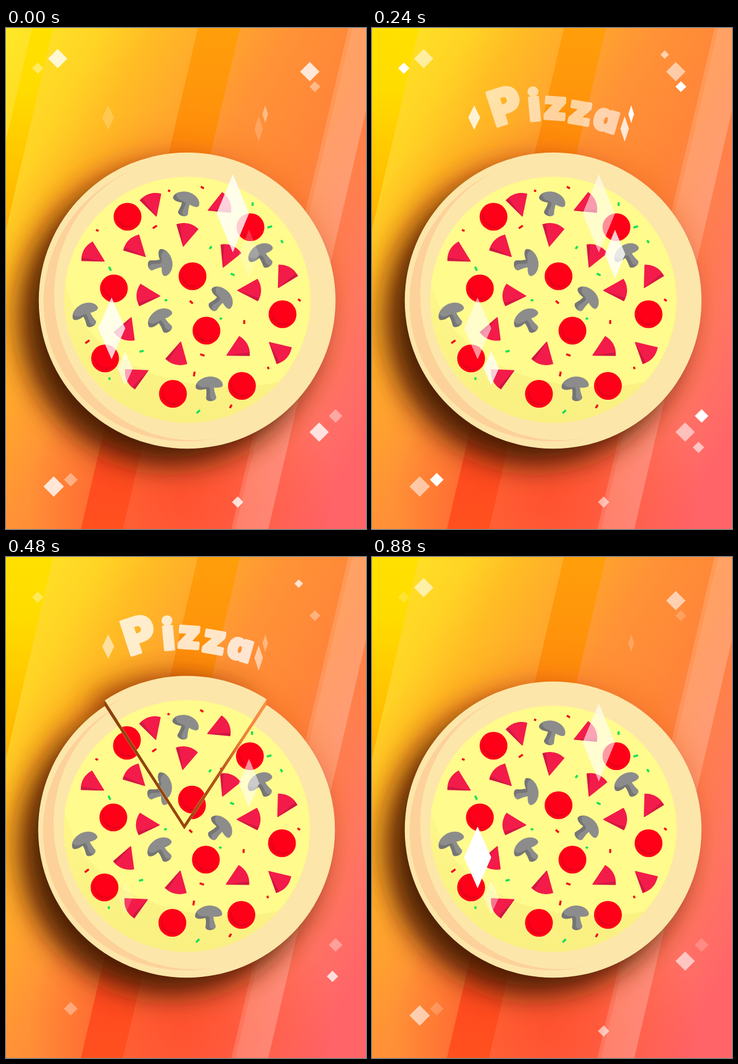
An HTML page for the animation above (0.96 s loop, 634 px wide and 884 px high).

```html
<!DOCTYPE html>
<html lang="en">
<head>
<meta charset="utf-8">
<title>Pizza</title>
<style>
html, body { margin: 0; width: 100%; height: 100%; overflow: hidden; background: #ff8a35; }
svg { display: block; width: 100vw; height: 100vh; }
#title text {
  font-family: Inter, "Open Sans", sans-serif; font-weight: 900; text-anchor: middle;
  font-feature-settings: "cv11"; fill: #fff; stroke: #fff; stroke-width: 5; stroke-linejoin: round;
}
</style>
</head>
<body>
<svg viewBox="0 0 634 884" preserveAspectRatio="none">
  <defs>
    <linearGradient id="sky" gradientUnits="userSpaceOnUse" x1="0" y1="0" x2="824" y2="472">
      <stop offset="0" stop-color="#ffe926"/>
      <stop offset=".16" stop-color="#ffd325"/>
      <stop offset=".24" stop-color="#ffbc24"/>
      <stop offset=".46" stop-color="#ff9236"/>
      <stop offset=".6" stop-color="#ff8539"/>
      <stop offset=".82" stop-color="#ff7864"/>
      <stop offset=".96" stop-color="#ff6468"/>
    </linearGradient>
    <radialGradient id="ember" gradientUnits="userSpaceOnUse" cx="310" cy="830" r="270">
      <stop offset="0" stop-color="#ff4a2a" stop-opacity=".85"/>
      <stop offset=".35" stop-color="#ff4a2a" stop-opacity=".65"/>
      <stop offset="1" stop-color="#ff4a2a" stop-opacity="0"/>
    </radialGradient>
    <linearGradient id="gold" gradientUnits="userSpaceOnUse" x1="0" y1="0" x2="0" y2="352">
      <stop offset="0" stop-color="#ffe000"/>
      <stop offset=".3" stop-color="#ffdc00"/>
      <stop offset="1" stop-color="#ffb200"/>
    </linearGradient>
    <linearGradient id="amber" gradientUnits="userSpaceOnUse" x1="0" y1="0" x2="0" y2="884">
      <stop offset="0" stop-color="#ff9f0a"/>
      <stop offset=".25" stop-color="#ff8c0c"/>
      <stop offset=".87" stop-color="#ff4a20"/>
      <stop offset="1" stop-color="#ff501e"/>
    </linearGradient>
    <linearGradient id="gap" gradientUnits="userSpaceOnUse" x1="174" y1="0" x2="459" y2="0">
      <stop offset="0" stop-color="#8c400c"/>
      <stop offset=".5" stop-color="#9a460c"/>
      <stop offset=".72" stop-color="#b8581c"/>
      <stop offset=".85" stop-color="#ee8038"/>
      <stop offset="1" stop-color="#fb9444"/>
    </linearGradient>
    <linearGradient id="rind" x1="0" y1="0" x2="0" y2="1">
      <stop offset=".4" stop-color="#fdf688"/>
      <stop offset="1" stop-color="#faf082"/>
    </linearGradient>
    <filter id="soft" x="-40%" y="-40%" width="180%" height="180%"><feGaussianBlur stdDeviation="24"/></filter>
    <filter id="wide" x="-40%" y="-40%" width="180%" height="180%"><feGaussianBlur stdDeviation="34"/></filter>
    <clipPath id="sliceClip"><path d="M315 481L105 154V0H532V152Z"/></clipPath>
    <clipPath id="restClip"><path clip-rule="evenodd" d="M0 0H634V884H0ZM315 481L105 154V0H532V152Z"/></clipPath>

    <g id="mushroom">
      <path fill="#8c8c8c" d="M-24 1C-25-9-11-17 1-17C14-17 24-9 24-1C24 5 13 4 8 3C8 10 10 16 11 20C11 28-6 29-7 21C-6 15-5 9-6 4C-12 6-22 6-24 1Z"/>
      <path fill="#757575" d="M-24 1C-24-2-22-5-20-7C-20-1-13 2-6 1L0 2C2 9 0 14 0 18C0 22 3 25 7 25C0 27-7 26-7 21C-6 15-5 9-6 4C-12 6-22 6-24 1Z"/>
    </g>
    <g id="tomato">
      <circle r="24.500" fill="#ff0018"/>
      <path fill="#ec001a" d="M-16-13A20.500 20.500 0 1 0 17 12A21.500 21.500 0 0 1-16-13Z"/>
    </g>
    <g id="wedge" stroke-width="1.500" stroke-linejoin="round">
      <path fill="#f31b49" stroke="#f31b49" d="M1 0L36-19Q47 0 36 19Z"/>
      <path fill="#cd1843" d="M0 0L36 19L38 14Z"/>
    </g>

    <g id="pizza">
      <circle cx="319" cy="481" r="261.300" fill="#fde6aa"/>
      <path fill="#fdd19a" d="M243 243A256 249 -18.400 0 0 400 716A235 249 -18.400 0 1 243 243Z"/>
      <circle cx="319.500" cy="480" r="217" fill="url(#rind)"/>
      <path fill="#fffb8c" d="M104 450A217 217 0 1 1 480 625C350 650 150 620 104 450Z"/>
      <g id="toppings"></g>
    </g>
  </defs>

  <rect width="634" height="884" fill="url(#sky)"/>
  <rect width="634" height="884" fill="url(#ember)"/>
  <path id="band" fill="url(#gold)"/>
  <path fill="url(#amber)" d="M338 0H412L206 884H132Z"/>
  <path fill="#ffe8dc" fill-opacity=".18" d="M603 0H668L462 884H397Z"/>
  <path fill="#ffe8dc" fill-opacity=".1" d="M610 0H668L462 884H404Z"/>

  <circle cx="300" cy="487" r="268" fill="#ea5c12" opacity=".65" filter="url(#wide)"/>
  <circle cx="288" cy="512" r="261" fill="#3a1500" opacity=".9" filter="url(#soft)"/>

  <use id="whole" href="#pizza"/>
  <g id="cut">
    <path d="M315 481L175 263A261 261 0 0 1 460 262Z" transform="translate(-26 -8)" fill="#8a3400" opacity=".85" filter="url(#soft)"/>
    <path d="M314 481L174 262L174 253L314 465L459 252L458 263Z" fill="url(#gap)"/>
    <g transform="translate(-1 0)"><g clip-path="url(#restClip)"><use href="#pizza"/></g></g>
    <g transform="translate(-1 -10)"><g clip-path="url(#sliceClip)"><use href="#pizza"/></g></g>
  </g>

  <g id="title"></g>
  <g id="sparks" fill="#fff"></g>
</svg>
<script>
const STEP = 80, COUNT = 12;
const $ = id => document.getElementById(id);

function add(parent, tag, attrs, text) {
  const el = document.createElementNS("http://www.w3.org/2000/svg", tag);
  for (const k in attrs) el.setAttribute(k, attrs[k]);
  if (text) el.textContent = text;
  parent.appendChild(el);
  return el;
}

const place = (x, y, r = 0) => `translate(${x} ${y}) rotate(${r})`;

// x, y, angle; a wedge is placed by its tip
const toppings = {
  wedge: [
    [265, 333, -107], [355, 322, -23], [312, 386, -78], [246, 404, -135], [174, 412, -150],
    [382, 423, -67], [479, 459, -60], [407, 463, -1], [272, 473, 183], [221, 510, 111],
    [308, 553, 103], [388, 578, -28], [463, 554, 42], [251, 604, 154]
  ],
  mushroom: [
    [317, 306, 20], [276, 414, 82], [449, 399, -30], [379, 477, 50],
    [140, 503, -24], [272, 514, -31], [358, 632, -4]
  ],
  tomato: [
    [214, 333], [430.5, 351.5], [328.5, 438], [190, 459.5], [487, 505],
    [353, 534], [174.5, 583], [294, 645.5], [415.5, 631.5]
  ]
};
const taken = [];
for (const kind in toppings)
  for (const [x, y, r = 0] of toppings[kind]) {
    const a = r * Math.PI / 180, reach = kind === "wedge" ? 24 : 0;
    taken.push([x + reach * Math.cos(a), y + reach * Math.sin(a)]);
    // mirror a wedge where needed so that its shaded edge faces down
    const flip = reach && .4 * Math.sin(a) + .9 * Math.cos(a) < 0 ? " scale(1 -1)" : "";
    add($("toppings"), "use", { href: "#" + kind, transform: place(x, y, r) + flip });
  }

let seed = 7;
function random() {
  seed = (seed * 16807) % 2147483647;
  return seed / 2147483647;
}

// herbs and chili go wherever there is free cheese
for (let n = 0, tries = 0; n < 23 && tries < 3000; tries++) {
  const a = random() * 2 * Math.PI, d = 206 * Math.sqrt(random());
  const x = 319 + d * Math.cos(a), y = 480 + d * Math.sin(a);
  if (taken.some(p => Math.hypot(p[0] - x, p[1] - y) < 33)) continue;
  taken.push([x, y]);
  const w = 4 + random() * 5;
  add($("toppings"), "rect", {
    x: -w / 2, y: -1.8, width: w, height: 3.6,
    fill: n++ % 2 ? "#0ce05c" : "#f00c1a", transform: place(x, y, random() * 180)
  });
}

// letter, baseline centre, angle, size
const letters = [
  ["P", 244, 166, -18, 85], ["i", 288, 163, -5, 74], ["z", 321, 161, 4, 70],
  ["z", 363, 169, 10, 70], ["a", 407, 181, 16, 67]
];
for (const [ch, x, y, r, size] of letters)
  add($("title"), "text", { transform: place(x, y, r), "font-size": size }, ch);

const sparks = [];
function spark(x, y, w, h, ...peaks) {
  const d = `M${x} ${y - h}l${w} ${h}l${-w} ${h}l${-w} ${-h}z`;
  sparks.push({ peaks, el: add($("sparks"), "path", { d }) });
}
// in a cluster each spark follows the one before it by two steps
const clusters = [
  [[91, 54, 17], [56, 71, 10]],
  [[535, 77, 17], [544, 103.5, 9.5], [515.5, 47, 7.5]],
  [[551.5, 713, 17], [580.5, 684.5, 12], [575, 740, 10]],
  [[84, 809, 18], [114, 797, 12]],
  [[408, 836.5, 10]]
];
for (const group of clusters)
  group.forEach(([x, y, r], k) => spark(x, y, r, r, 1 + 2 * k));
spark(180, 158, 10.5, 21.5, 4);
spark(456.5, 152, 5, 15.5, 3);
spark(445, 178, 7.5, 22.5, 4);
spark(399.5, 327, 28.5, 69, 1);
spark(428, 399, 18, 43, 4);
spark(186, 530, 24, 54.5, 11, 1);
spark(210, 600.5, 13.5, 30, 2);

// five even steps up, then an eased way down
function glow(i, peak) {
  const d = (i - peak + COUNT) % COUNT;
  return d < 6 ? (1 - d / 5) ** 1.15 : Math.max(0, 1 - (COUNT - d) / 5);
}

function draw(ms) {
  const i = Math.floor(ms / STEP) % COUNT;
  const open = i % 4 === 1 || i % 4 === 2;
  $("whole").style.display = open ? "none" : "";
  $("cut").style.display = open ? "" : "none";
  $("band").setAttribute("d", i === 0 ? "M46 0H83L0 356V198Z" : "M0 0H83L0 356Z");
  $("title").setAttribute("opacity", glow(i, 5));
  for (const { el, peaks } of sparks)
    el.setAttribute("opacity", Math.max(...peaks.map(p => glow(i, p))));
}

let start;
function tick(now) {
  start ??= now;
  draw(now - start);
  requestAnimationFrame(tick);
}
draw(0);
requestAnimationFrame(tick);
</script>
</body>
</html>
```
